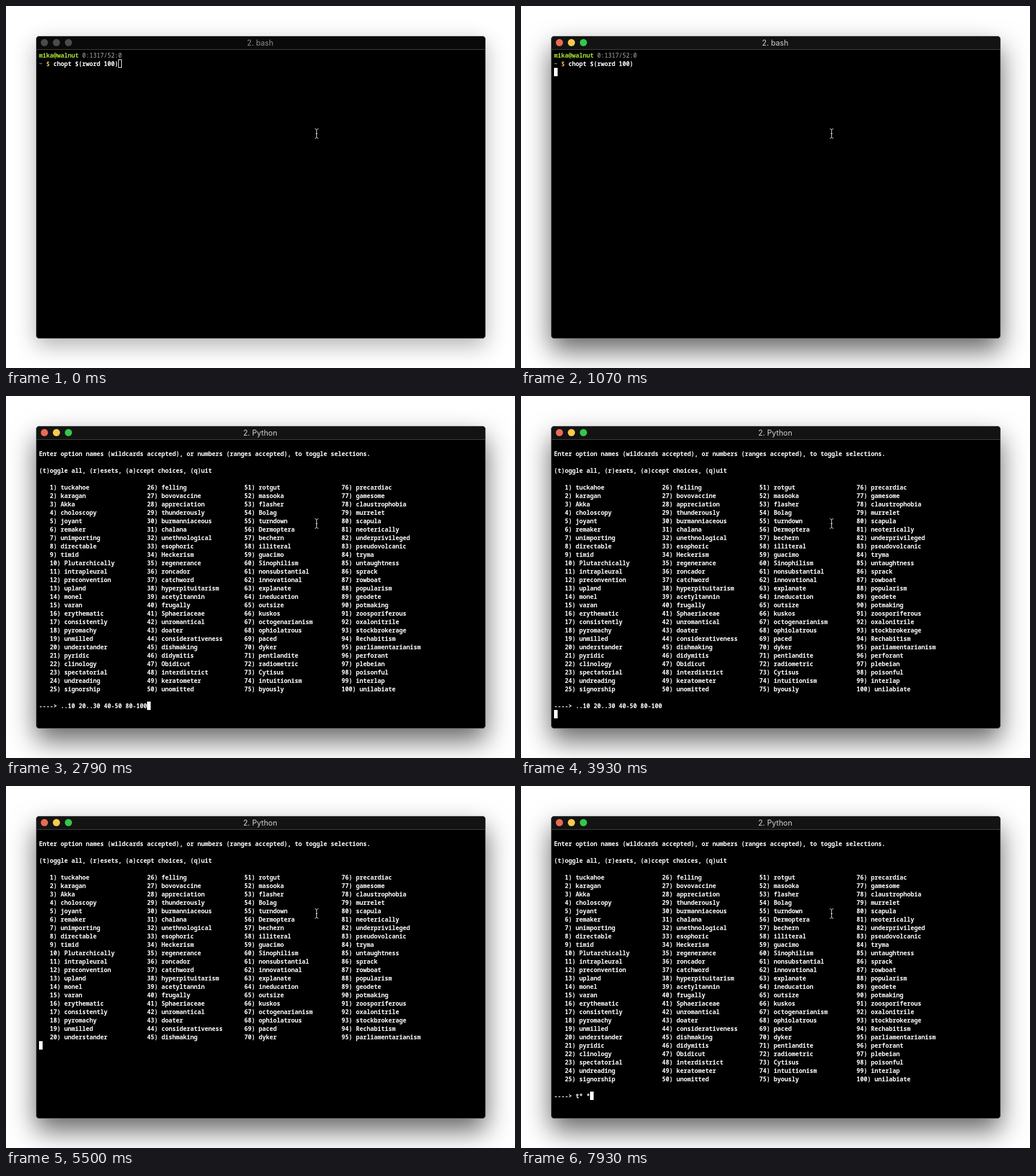
Recreate the animation shown at these times as an HTML page. Size 848x603 px, loop 8 s.

```html
<!DOCTYPE html>
<html lang="en">
<head>
<meta charset="utf-8">
<title>Terminal</title>
<style>
  html, body { margin: 0; width: 100%; height: 100%; overflow: hidden; background: #fff; }
  #win {
    position: absolute; left: 50px; top: 50px; width: 749px; height: 504px;
    box-sizing: border-box; border: 1px solid #4b4d4c; border-radius: 5px;
    background: #000; box-shadow: 0 20px 44px rgba(0, 0, 0, .6);
  }
  #bar {
    height: 21px; border-bottom: 1px solid #434645; border-radius: 4px 4px 0 0;
    background: #131313; color: #d2d2d2;
    font: 12.6px/21px Inter, Roboto, sans-serif; text-align: center; text-indent: -2px;
  }
  #bar i { position: absolute; top: 4px; width: 12px; height: 12px; border-radius: 50%; }
  #bar i:nth-of-type(1) { left: 7px; background: #ec6a54; }
  #bar i:nth-of-type(2) { left: 27px; background: #fbca49; }
  #bar i:nth-of-type(3) { left: 47px; background: #32c84b; }
  #win.idle { box-shadow: 0 12px 36px rgba(0, 0, 0, .3); }
  .idle #bar { background: #0a0a0a; color: #8d8d8d; }
  .idle #bar i:nth-of-type(n) { background: #4b4b4b; }
  #screen {
    position: absolute; left: 4px; top: 24px; margin: 0; color: #fff;
    font: bold 10px/14px "Noto Sans Mono", "DejaVu Sans Mono", monospace;
    font-variant-ligatures: none;
  }
  .user { color: #a6e23a; font-weight: 600; }
  .info { color: #b9a8a8; font-weight: 500; }
  .dir { color: #4fcfd0; }
  .sign { color: #f3b548; }
  .cursor { display: inline-block; width: 6px; height: 14px; vertical-align: top; background: #fff; }
  .idle .cursor { background: none; box-shadow: inset 0 0 0 1px #fff; }
  #beam { position: absolute; left: 514px; top: 204px; fill: none; stroke: #e4e4e4; }
</style>
</head>
<body>
<div id="win">
  <div id="bar"><i></i><i></i><i></i><span id="title"></span></div>
  <pre id="screen"></pre>
</div>
<svg id="beam" width="7" height="17"><path d="M.5 .5Q3.5 .5 3.5 3V14Q3.5 16.5 .5 16.5M6.5 .5Q3.5 .5 3.5 3M3.5 14Q3.5 16.5 6.5 16.5M2 8.5H5"/></svg>
<script>
const words = `tuckahoe karagan Akka choloscopy joyant remaker unimporting directable timid Plutarchically
intrapleural preconvention upland monel varan erythematic consistently pyromachy unmilled understander
pyridic clinology spectatorial undreading signorship felling bovovaccine appreciation thunderously burmanniaceous
chalana unethnological esophoric Heckerism regenerance roncador catchword hyperpituitarism acetyltannin frugally
Sphaeriaceae unromantical doater considerativeness dishmaking didymitis Obidicut interdistrict keratometer unomitted
rotgut masooka flasher Bolag turndown Dermoptera bechern illiteral guacimo Sinophilism
nonsubstantial innovational explanate ineducation outsize kuskos octogenarianism ophiolatrous paced dyker
pentlandite radiometric Cytisus intuitionism byously precardiac gamesome claustrophobia murrelet scapula
neoterically underprivileged pseudovolcanic tryma untaughtness sprack rowboat popularism geodete potmaking
zoosporiferous oxalonitrile stockbrokerage Rechabitism parliamentarianism perforant plebeian poisonful interlap unilabiate`.split(/\s+/);

const ROWS = 25, COLS = 4, COL_WIDTH = 27;
const cursor = '<span class="cursor"></span>';
const picks = '..10 20..30 40-50 80-100';
const ranges = [[1, 10], [20, 30], [40, 50], [80, 100]];
const isPicked = n => ranges.some(([a, b]) => n >= a && n <= b);

const shell = tail =>
  '<span class="user">mika@walnut</span> <span class="info">0:1317/52:0</span>\n' +
  '<span class="dir">~</span> <span class="sign">$</span> chopt $(rword 100)' + tail + cursor;

function list(marked, rows = ROWS) {
  let out = '\nEnter option names (wildcards accepted), or numbers (ranges accepted), to toggle selections.\n\n' +
    '(t)oggle all, (r)esets, (a)ccept choices, (q)uit\n\n';
  for (let r = 0; r < rows; r++) {
    for (let c = 0; c < COLS; c++) {
      const n = c * ROWS + r + 1;
      const mark = marked && isPicked(n) ? '+' : ' ';
      out += ` ${mark} ${n}) ${words[n - 1]}`.padEnd(COL_WIDTH);
    }
    out += '\n';
  }
  return out;
}
const menu = (marked, input) => list(marked) + '\n----&gt; ' + input + cursor;

// start time in ms, screen content
const scenes = [
  [0, shell('')],
  [1070, shell('\n')],
  [1430, menu(false, '')],
  [2790, menu(false, picks)],
  [3930, menu(false, picks + '\n')],
  [4000, menu(true, '')],
  [4790, menu(true, picks)],
  [5430, menu(true, picks + '\n')],
  [5500, list(false, 20) + cursor],
  [5570, menu(false, '')],
  [7210, menu(false, 't')],
  [7570, menu(false, 't*')],
  [7710, menu(false, 't* ')],
  [7930, menu(false, 't* *')]
];

const $ = id => document.getElementById(id);
const start = performance.now();
let shown;

function draw() {
  const t = (performance.now() - start) % 8000;
  const scene = scenes.findLast(s => s[0] <= t);
  if (scene !== shown) {
    $('screen').innerHTML = scene[1];
    shown = scene;
  }
  $('win').className = t < 70 ? 'idle' : '';
  $('title').textContent = t < 2000 ? '2. bash' : '2. Python';
  $('beam').style.visibility = t >= 70 && t < 430 ? 'hidden' : 'visible';
  requestAnimationFrame(draw);
}
draw();
</script>
</body>
</html>
```
